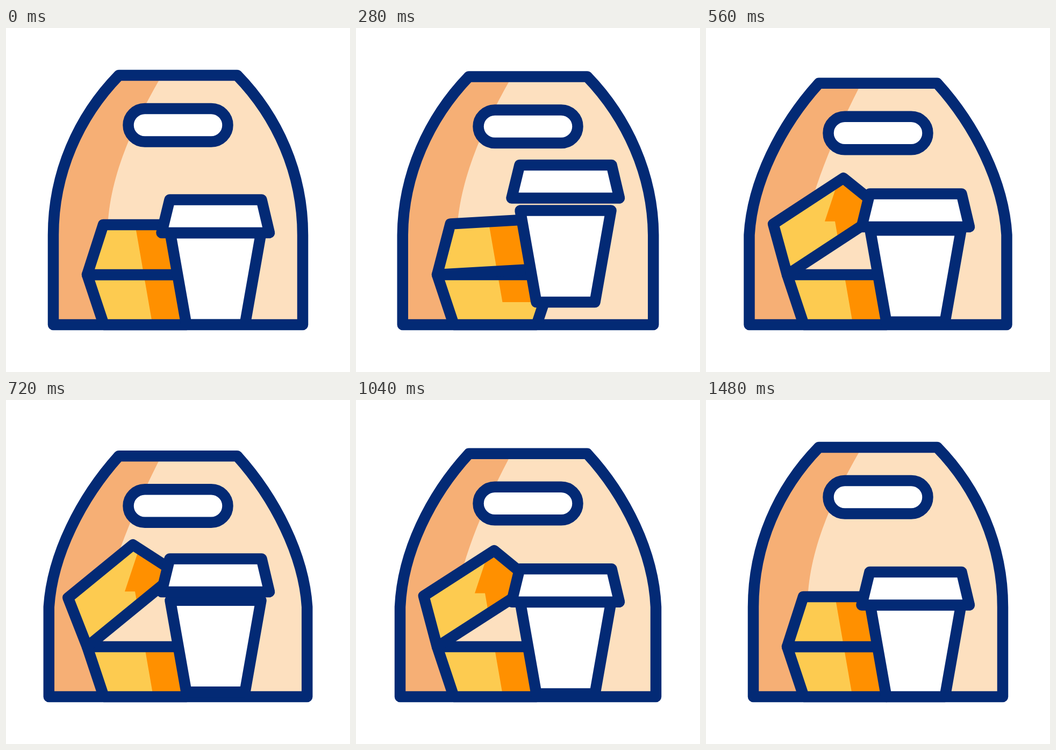
An HTML page with a canvas for the animation above (1560 ms loop, 640 by 640 pixels).

```html
<!DOCTYPE html>
<html lang="en">
<head>
<meta charset="utf-8">
<title>Takeaway bag</title>
<style>
  html, body { margin: 0; height: 100%; overflow: hidden; background: #fff; }
  canvas { display: block; width: 100vmin; height: 100vmin; }
</style>
</head>
<body>
<canvas width="640" height="640"></canvas>
<script>
const ctx = document.querySelector('canvas').getContext('2d');
const LOOP = 1560;
const NAVY = '#032a75', CREAM = '#fde0bf', PEACH = '#f6af75', YELLOW = '#fdcb50', ORANGE = '#ff9000';
const HINGE = [151, 459];

const progress = (t, from, to) => Math.min(1, Math.max(0, (t - from) / (to - from)));
const cubicInOut = p => p < .5 ? 4 * p ** 3 : 1 - 4 * (1 - p) ** 3;
const mix = (a, b, k) => a + (b - a) * k;

// Height of a bouncing body; each hop is [start, end, peak].
function bounce(t, hops) {
  const hop = hops.find(([from, to]) => t >= from && t < to);
  if (!hop) return 0;
  const p = progress(t, hop[0], hop[1]);
  return 4 * hop[2] * p * (1 - p);
}

function polygon(points, dy = 0) {
  const path = new Path2D();
  points.forEach(([x, y]) => path.lineTo(x, y + dy));
  path.closePath();
  return path;
}

function fill(path, color) {
  ctx.fillStyle = color;
  ctx.fill(path);
}

function outline(path) {
  ctx.strokeStyle = NAVY;
  ctx.lineWidth = 20.5;
  ctx.lineJoin = 'round';
  ctx.stroke(path);
}

function shape(path, color) {
  fill(path, color);
  outline(path);
}

function fillInside(area, path, color) {
  ctx.save();
  ctx.clip(area);
  fill(path, color);
  ctx.restore();
}

function rotate([x, y], angle) {
  const [hx, hy] = HINGE, c = Math.cos(angle), s = Math.sin(angle);
  return [hx + (x - hx) * c - (y - hy) * s, hy + (x - hx) * s + (y - hy) * c];
}

function drawBag(squash) {
  const m = (a, b) => mix(a, b, squash);
  const left = m(88, 79.8), top = m(88, 104.2);
  const c1 = [m(88, 86), m(270, 288)], c2 = [m(135, 140), m(165, 182)];
  const bag = new Path2D();
  bag.moveTo(left, 552);
  bag.lineTo(left, 385);
  bag.bezierCurveTo(...c1, ...c2, 210, top);
  bag.lineTo(430, top);
  bag.bezierCurveTo(640 - c2[0], c2[1], 640 - c1[0], c1[1], 640 - left, 385);
  bag.lineTo(640 - left, 552);
  bag.closePath();

  const edge = m(189, 181);
  const shade = new Path2D();
  shade.moveTo(0, 552);
  shade.lineTo(edge, 552);
  shade.lineTo(edge, 385);
  shade.bezierCurveTo(m(189, 200), m(280, 290), m(238, 250), m(178, 180), m(290, 289), top);
  shade.lineTo(0, top);

  fill(bag, CREAM);
  fillInside(bag, shade, PEACH);
  outline(bag);

  const handle = new Path2D();
  handle.roundRect(227.5, top + 62, 185, 61.5, 30.75);
  shape(handle, '#fff');
}

function drawBox(angle, cupLift) {
  const shadow = polygon([[221, 365], [261, 245], [420, 245], [420, 552], [272.5, 552], [240, 365]], -cupLift);
  const base = polygon([HINGE, [367, 459], [336, 552], [182, 552]]);
  const lid = polygon([HINGE, [181, 366], [337, 366], [367, 459]].map(p => rotate(p, -angle)));
  for (const part of [base, lid]) {
    fill(part, YELLOW);
    fillInside(part, shadow, ORANGE);
    outline(part);
  }
}

function drawCup(cupLift, lidLift) {
  shape(polygon([[305.5, 381.5], [474.5, 381.5], [444.5, 552], [335.5, 552]], -cupLift), '#fff');
  shape(polygon([[304.5, 320], [475.5, 320], [490, 381.5], [289.5, 381.5]], -lidLift), '#fff');
}

function draw(t) {
  const squash = cubicInOut(progress(t, 40, 760)) - cubicInOut(progress(t, 760, 1450));
  const opening = 1 - (1 - progress(t, 260, 760)) ** 2;
  const closing = progress(t, 760, 1440) ** 2;
  const angle = 39.5 * (opening - closing) * Math.PI / 180;
  const cupLift = bounce(t, [[0, 580, 42], [580, 1120, 11.2], [1120, 1470, 8]]);
  const lidLift = Math.max(cupLift, bounce(t, [[0, 588, 65.2], [588, 1065, 30.5], [1065, 1470, 23.5]]));

  ctx.clearRect(0, 0, 640, 640);
  drawBag(squash);
  drawBox(angle, cupLift);
  drawCup(cupLift, lidLift);
}

function frame() {
  draw(performance.now() % LOOP);
  requestAnimationFrame(frame);
}
frame();
</script>
</body>
</html>
```
